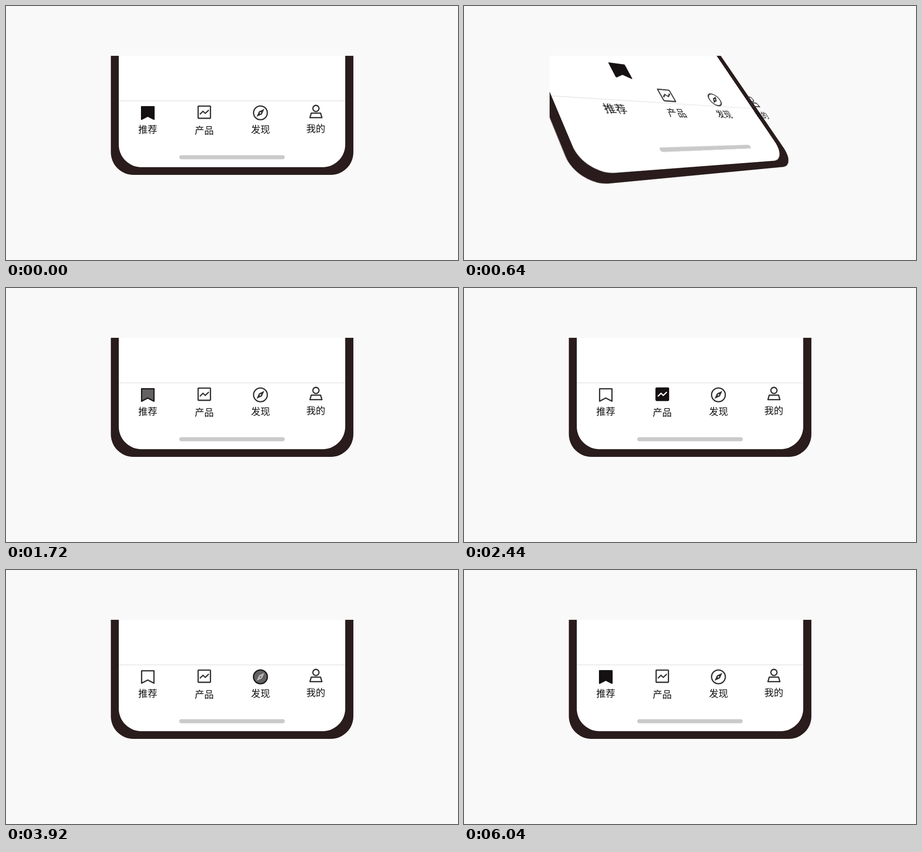
Write an HTML page that moves like this. It is 998 px wide and 561 px high and loops after 6.28 s.

```html
<!DOCTYPE html>
<html lang="zh-CN">
<head>
<meta charset="utf-8">
<style>
  html, body { margin: 0; width: 100%; height: 100%; overflow: hidden; background: #f9f9f9; }
  .scene { position: absolute; left: 0; top: 0; width: 998px; height: 561px;
    perspective: 1000px; perspective-origin: 499px 280.5px; }
  #window { clip-path: inset(110px 189px 102px 189px); }
  svg { position: absolute; left: 0; top: 0; overflow: visible; transform-origin: 499px 209.5px; }
  text { font: 21px "Noto Sans CJK SC", "Noto Sans CJK", "Noto Sans SC", sans-serif; text-anchor: middle; fill: #111; }
  .outline { fill: none; stroke: #333; stroke-width: 2.8; stroke-linejoin: round; }
  .solid { fill: #151011; stroke: #151011; stroke-width: 2.8; stroke-linejoin: round; }
  .needle { fill: #333; }
  .solid .needle { fill: #fff; stroke: none; }
  .zigzag { fill: none; stroke-width: 2.6; stroke-linejoin: miter; }
  .solid .zigzag { stroke: #fff; }
</style>
</head>
<body>
<div class="scene" id="window">
  <svg width="998" height="561" data-lift="0">
    <path fill="#2a1c1d" d="M231.5-400H767V323a50 50 0 0 1-50 50H281.5a50 50 0 0 1-50-50Z"/>
    <path fill="#fff" d="M249-400H749V306a50 50 0 0 1-50 50H299a50 50 0 0 1-50-50Z"/>
    <path stroke="#e1e1e1" stroke-width="1.3" d="M249 209.5H749"/>
  </svg>
</div>
<div class="scene">
  <svg width="998" height="561" data-lift="25">
    <rect x="382.5" y="329.5" width="233" height="9" rx="4.5" fill="#cacaca"/>
  </svg>
  <svg width="998" height="561" data-lift="50">
    <circle id="ripple" cy="246.5" fill="#000"/>
    <text x="313" y="279.5">推荐</text>
    <text x="437.7" y="282">产品</text>
    <text x="562" y="280">发现</text>
    <text x="684" y="278">我的</text>

    <g class="outline">
      <rect x="424.2" y="221.2" width="27.2" height="26.8" rx="1"/>
      <path class="zigzag" d="M428 239.3L435 232.5L440 237.2L447.8 229.8"/>
    </g>
    <g class="solid">
      <rect x="424.2" y="221.2" width="27.2" height="26.8" rx="1"/>
      <path class="zigzag" id="trend" pathLength="1" d="M428 239.3L435 232.5L440 237.2L447.8 229.8"/>
    </g>

    <g class="outline">
      <circle cx="561.8" cy="236" r="15.2"/>
      <g stroke="none">
        <path class="needle" d="M570.5 227.3L565 239.2L553.1 244.7L558.6 232.8Z"/>
        <circle cx="561.8" cy="236" r="1.7" fill="#fff"/>
      </g>
    </g>
    <g class="solid">
      <circle cx="561.8" cy="236" r="15.2"/>
      <g id="needle" stroke="none">
        <path class="needle" d="M570.5 227.3L565 239.2L553.1 244.7L558.6 232.8Z"/>
        <circle cx="561.8" cy="236" r="1.7"/>
      </g>
    </g>

    <g class="outline">
      <circle cx="684.3" cy="226.3" r="6.8"/>
      <path d="M674 236.6H694.6L697.5 246.6H671.1Z"/>
    </g>
    <g class="solid">
      <circle cx="684.3" cy="226.3" r="6.8"/>
      <path d="M674 236.6H694.6L697.5 246.6H671.1Z"/>
    </g>
  </svg>
  <svg width="998" height="561" data-lift="100">
    <path class="outline" d="M299.4 222.7H326.7V250L313 243L299.4 250Z"/>
    <path class="solid" d="M299.4 222.7H326.7V250L313 243L299.4 250Z"/>
  </svg>
</div>
<script>
const LOOP = 6280;
const layers = [...document.querySelectorAll('svg')];
const [chart, compass, person, bookmark] = document.querySelectorAll('.solid');
const ripple = document.getElementById('ripple');
const trend = document.getElementById('trend');
const needle = document.getElementById('needle');

// Each tap selects a tab; fill is the time span of its fade-in after the tap.
const tabs = [
  { icon: chart, x: 437.7, tap: 1680, leave: 2680, fill: [80, 400] },
  { icon: compass, x: 561.8, tap: 2680, leave: 3880, fill: [80, 400] },
  { icon: person, x: 684.3, tap: 3880, leave: 4920, fill: [240, 800] },
  { icon: bookmark, x: 312.5, tap: 4920, leave: 1680, fill: [80, 640] }
];

const ramp = (t, from, to) => Math.min(1, Math.max(0, (t - from) / (to - from)));
const ease = (t, from, to) => { const k = ramp(t, from, to); return k * k * (3 - 2 * k); };
const since = (t, start) => (t - start + LOOP) % LOOP;

function pose(tilt, lift) {
  for (const layer of layers) {
    layer.style.transform = tilt + lift === 0 ? 'none' :
      `translate3d(${-37 * tilt}px, ${16.6 * tilt}px, ${154.7 * tilt}px) ` +
      `rotateY(${50.4 * tilt}deg) rotateX(${43.6 * tilt}deg) translateZ(${layer.dataset.lift * lift}px)`;
  }
}

function draw(t) {
  // The layers settle back slightly after the tilt.
  const rise = ease(t, 0, 800);
  pose(rise - ease(t, 1000, 1500), rise - ease(t, 1020, 1520));

  let rippleOpacity = 0;
  for (const { icon, x, tap, leave, fill } of tabs) {
    const age = since(t, tap);
    const selected = age < since(leave, tap);
    icon.style.opacity = selected ? ease(age, ...fill) : 1 - ramp(since(t, leave), 0, 120);
    if (age < 520) {
      ripple.setAttribute('cx', x);
      ripple.setAttribute('r', 33 * ease(age, 40, 360));
      rippleOpacity = 0.08 * (1 - ramp(age, 240, 520));
    }
  }
  ripple.style.opacity = rippleOpacity;

  const drawn = ease(t, 2000, 2440);
  trend.style.strokeDasharray = drawn < 1 ? `${drawn} 2` : 'none';
  trend.style.visibility = drawn > 0 ? 'visible' : 'hidden';
  needle.setAttribute('transform', `rotate(${360 * ease(t, 2840, 3760)} 561.8 236)`);
}

const start = performance.now();
function tick() {
  draw((performance.now() - start) % LOOP);
  requestAnimationFrame(tick);
}
draw(0);
requestAnimationFrame(tick);
</script>
</body>
</html>
```
